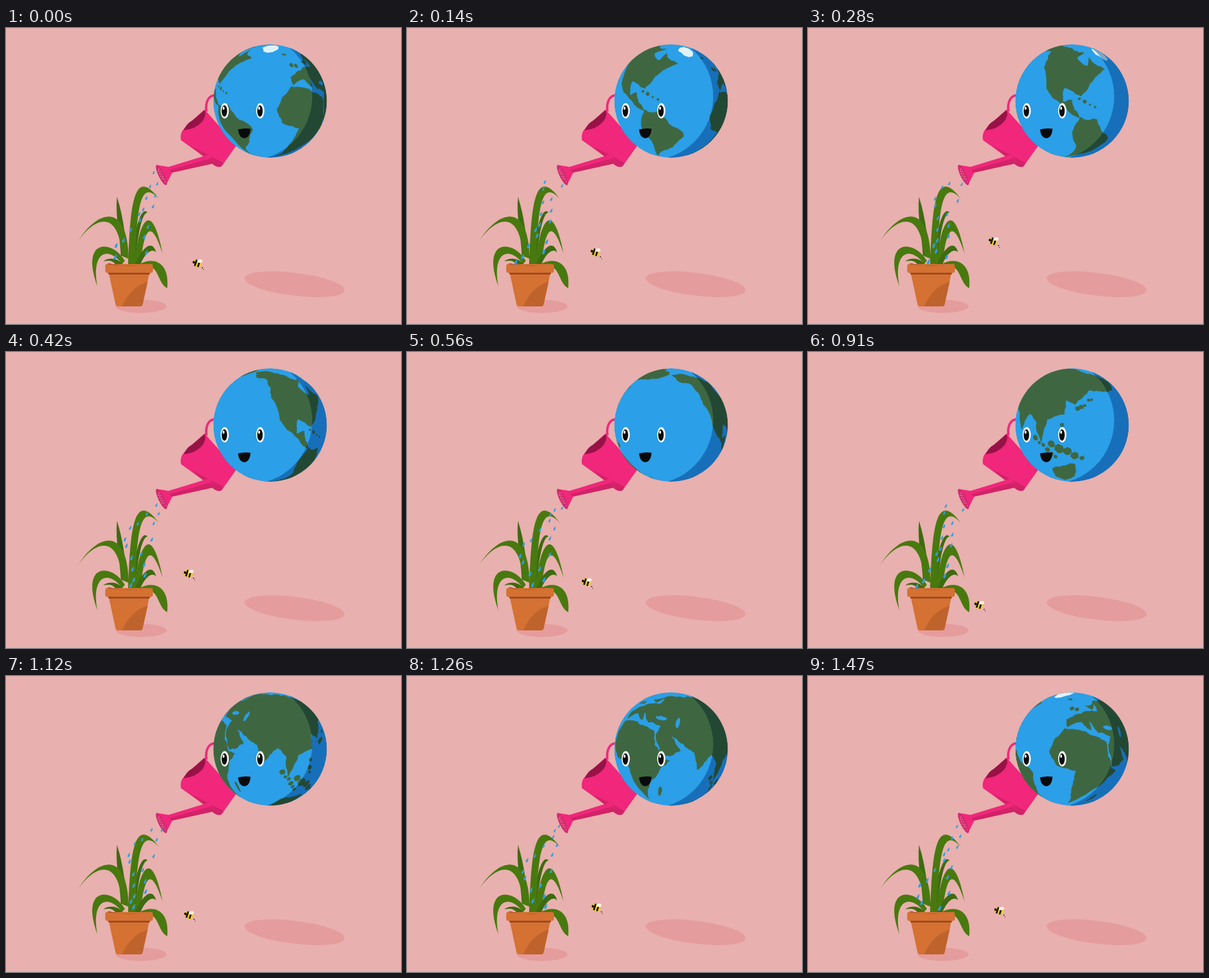
Recreate the animation shown at these times as an HTML page. Size 605 px wide and 454 px high, loop 1540 ms.

```html
<!DOCTYPE html>
<html lang="en">
<head>
<meta charset="utf-8">
<title>Watering the plant</title>
<style>
html, body { margin: 0; width: 100%; height: 100%; overflow: hidden; background: #e8b0ae }
svg { display: block }
#night { mix-blend-mode: multiply }
</style>
</head>
<body>
<svg width="605" height="454" viewBox="0 0 605 454">
  <defs>
    <clipPath id="disc"><circle cx="404.5" cy="112" r="87"/></clipPath>
    <mask id="day"><rect width="605" height="454" fill="#fff"/><circle cx="371" cy="105" r="98"/></mask>
    <g id="eye">
      <ellipse rx="6.3" ry="11.7" fill="#fff"/>
      <ellipse cx="-.5" cy=".3" rx="4.2" ry="8.8" fill="#090a0c"/>
      <ellipse cx="-1.8" cy="-4" rx="1.5" ry="2.5" fill="#fff"/>
    </g>
  </defs>
  <rect width="605" height="454" fill="#e8b0ae"/>
  <g fill="#e59c9c">
    <ellipse cx="442" cy="393" rx="77" ry="17.5" transform="rotate(7 442 393)"/>
    <ellipse cx="207" cy="427" rx="39" ry="10"/>
  </g>

  <g fill="#48790f">
    <path fill="#3d6b10" d="M186 345C182 318 180 290 170 259C167 290 175 320 176 350Z"/>
    <path d="M188 354C186 265 140 280 111 326C135 292 172 275 178 350Z"/>
    <path d="M182 357C163 324 113 322 140 396C130 344 156 333 178 362Z"/>
    <path fill="#3d6b10" d="M192 350C198 306 207 272 217 283C209 283 203 310 199 350Z"/>
    <path d="M187 363C190 290 192 205 234 262C207 232 200 270 198 363Z"/>
    <path d="M197 363C202 300 222 256 240 346C222 292 212 305 206 363Z"/>
    <path fill="#3d6b10" d="M198 362C208 339 223 322 230 344C222 336 212 348 206 362Z"/>
    <path d="M203 363C225 350 251 358 247 399C230 390 237 362 207 363Z"/>
    <path fill="#3d6b10" d="M149 358C158 350 174 354 179 363L168 363C164 357 158 356 149 358Z"/>
  </g>
  <path fill="#d47133" d="M157 374H220L209 425Q208 427 205 427H172Q169 427 168 425Z"/>
  <path fill="#bf632c" d="M217 389Q191 397 178 427H205Q208 427 209 425Z"/>
  <path fill="#98461f" d="M156 374H221L220 378H157Z"/>
  <rect x="152" y="362" width="73" height="13.5" rx="3" fill="#d47133"/>
  <path fill="#98461f" d="M155 362Q158 360 162 362L175 364H207L222 362Q189 367 155 362Z"/>

  <path d="M307 128C305 114 310 103 321 103" fill="none" stroke="#ee2a7b" stroke-width="3.6"/>
  <path fill="#f0277a" d="M304 125L353 180L331 211Q328 215 322 211L268 172Q266 161 273 154Z"/>
  <path fill="#d22268" d="M284 181L300 195L318 210Q327 216 331 211L333 207Z"/>
  <path fill="#981247" d="M304 126Q308 132 301 143Q291 155 272 157Q276 147 285 142Z"/>
  <path fill="#f0277a" d="M311 194L249 213L230 210L245 241L255 221L321 207Z"/>
  <path fill="#d22268" d="M321 207L254 222L250 218L314 200Z"/>
  <ellipse cx="238" cy="225.5" rx="4.5" ry="17" transform="rotate(-26 238 225.5)" fill="#d22c70"/>
  <path d="M234 216L244 236M233 219L240 233" stroke="#f7a6bd" stroke-width="1.2" stroke-dasharray="1.3 3"/>

  <g clip-path="url(#disc)">
    <circle cx="404.5" cy="112" r="87" fill="#2b9fe7"/>
    <g transform="translate(404.5 112) rotate(12)">
      <path id="land" fill="#3e6741"/>
      <path id="seas" fill="#2b9fe7"/>
      <path id="ice" fill="#dff2f9"/>
    </g>
    <circle id="night" cx="404.5" cy="112" r="87" fill="#8cb2cc" mask="url(#day)"/>
  </g>
  <use href="#eye" x="335" y="127"/>
  <use href="#eye" x="389.5" y="127"/>
  <path fill="#090a0c" d="M355.5 155.5Q365 153 374.5 154.5C374 164 370 169 365 169C360 169 356 164 355.5 155.5Z"/>

  <g id="drops" fill="#2f9de2"></g>
  <g id="bee">
    <g transform="rotate(18)">
      <ellipse rx="7" ry="5.8" fill="#f5c92c"/>
      <path d="M-2.5 -5V5M2.5 -5V5" stroke="#17130e" stroke-width="2.6"/>
      <circle cx="-5.5" r="2" fill="#17130e"/>
      <ellipse cx="3" cy="-4.5" rx="4" ry="2.6" fill="#f7efe6" transform="rotate(-25 3 -4)"/>
    </g>
    <path fill="#17130e" d="M7 6h1.5v1.5h-1.5zM9 9h1v1h-1z"/>
  </g>
</svg>
<script>
const LOOP = 1540, STEP = 70, RADIUS = 87;
const byId = id => document.getElementById(id);
const random = n => { const r = Math.sin(n * 127.1 + 3) * 43758.5453; return r - Math.floor(r); };
const mix = (a, b, u) => a + (b - a) * u;

// Key corners of each coast as "longitude,latitude"; roughen() adds the detail
const corners = text => text.split(' ').map(p => p.split(',').map(Number));
const continents = [
  '-168,66 -120,70 -84,68 -93,58 -79,52 -77,62 -57,52 -70,43 -81,25 -96,29 -95,18 -88,21 -78,8 -95,15 -124,42 -135,58',
  '-78,9 -62,10 -35,-6 -40,-20 -58,-37 -68,-53 -70,-18 -81,-5',
  '-8,35 11,36 32,31 43,12 51,11 40,-6 20,-35 12,-16 9,4 -9,5 -17,15',
  '-9,43 -6,36 5,43 16,38 13,45 23,37 36,36 34,29 44,13 58,20 48,30 66,25 66,74 25,71 6,60 16,57 22,65 24,57 -3,48',
  '58,76 58,26 70,21 77,8 88,22 97,16 104,1 107,20 121,27 119,38 128,36 140,52 157,53 188,66 150,75',
  '114,-22 136,-12 142,-12 153,-27 147,-38 115,-34'
].map(corners);

// Midpoint displacement
function roughen(shape, seed, depth = 3) {
  if (!depth) return shape;
  const finer = shape.flatMap(([x, y], i) => {
    const [nx, ny] = shape[(i + 1) % shape.length], bend = 0.24 * (random(seed + i) - 0.5);
    return [[x, y], [(x + nx) / 2 + bend * (ny - y), (y + ny) / 2 - bend * (nx - x)]];
  });
  return roughen(finer, seed + 50, depth - 1);
}

function blob(x, y, rx, ry) {
  const ring = Array.from({ length: 7 }, (_, i) => {
    const a = i * 2 * Math.PI / 7;
    return [x + rx * Math.cos(a), y + ry * Math.sin(a)];
  });
  return roughen(ring, x + y, 1);
}

// Islands strung between two places
const chain = (x0, y0, x1, y1, count, size) => Array.from({ length: count }, (_, i) => {
  const u = i / (count - 1), s = size * mix(0.6, 1.3, random(i + x0));
  return blob(mix(x0, x1, u), mix(y0, y1, u) + 3 * (random(i + y0) - 0.5), s, s * 0.8);
});

const land = [
  ...continents.map((shape, i) => roughen(shape, i * 20)),
  ...chain(131, 33, 143, 44, 5, 2), ...chain(97, 3, 119, -9, 6, 2.6), ...chain(114, 1, 146, -6, 5, 4),
  ...chain(121, 17, 125, 8, 3, 2), ...chain(-82, 22, -67, 18, 4, 1.8), ...chain(-8, 53, -2, 54, 2, 2.4),
  ...chain(168, -45, 176, -38, 3, 2), blob(47, -19, 2.5, 6), blob(-18, 65, 4, 1.5)
];
const seas = [blob(34, 43, 6, 2), blob(51, 42, 2, 5)];
const ice = [blob(-47, 72, 17, 9)];

// Flat map wrapped over the visible half of the ball
function project([lon, lat]) {
  const angle = (deg, scale) => Math.max(-90, Math.min(90, deg * scale)) * Math.PI / 180;
  const u = angle(lon, 1.2), v = angle(lat - 20, 1.3);
  return (RADIUS * Math.cos(v) * Math.sin(u)).toFixed(1) + ' ' + (-RADIUS * Math.sin(v)).toFixed(1);
}

function drawMap(id, shapes, center) {
  const outline = (shape, turn) => 'M' + shape.map(([x, y]) => project([x - center + turn, y])).join('L') + 'Z';
  byId(id).setAttribute('d', shapes.flatMap(s => [-720, -360, 0, 360].map(turn => outline(s, turn))).join(''));
}

const drops = Array.from({ length: 16 }, (_, i) => {
  const el = document.createElementNS('http://www.w3.org/2000/svg', 'path');
  el.setAttribute('d', 'M1.5 -5C3 0 2.5 4 0 4C-2.5 4 -2 0 1.5 -5Z');
  byId('drops').append(el);
  const side = random(i);
  return { el, phase: i / 16, x: 222 + 19 * side, y: 218 + 18 * side, endX: 162 + 55 * side };
});

function drawDrops(t) {
  for (const { el, phase, x, y, endX } of drops) {
    const u = (t / (LOOP / 2) + phase) % 1;
    const px = mix(x, endX, 1 - (1 - u) ** 2), py = mix(y, 360, u);
    el.setAttribute('transform', `translate(${px} ${py}) rotate(12) scale(${mix(0.65, 1, u)})`);
  }
}

const flight = [[0, 293, 361], [280, 284, 327], [560, 275, 353], [910, 262, 388], [1260, 290, 355], [LOOP, 293, 361]];
function drawBee(t) {
  const i = flight.findIndex(p => p[0] > t), [t0, x0, y0] = flight[i - 1], [t1, x1, y1] = flight[i];
  const u = (t - t0) / (t1 - t0), ease = u * u * (3 - 2 * u);
  byId('bee').setAttribute('transform', `translate(${mix(x0, x1, ease)} ${mix(y0, y1, ease)})`);
}

let shown = -1;
function frame(now) {
  const step = Math.floor(now % LOOP / STEP);
  if (step !== shown) {
    shown = step;
    const center = -24 - 15.9 * step;
    drawMap('land', land, center);
    drawMap('seas', seas, center);
    drawMap('ice', ice, center);
    drawDrops(step * STEP);
    drawBee(step * STEP);
  }
  requestAnimationFrame(frame);
}
frame(0);
</script>
</body>
</html>
```
